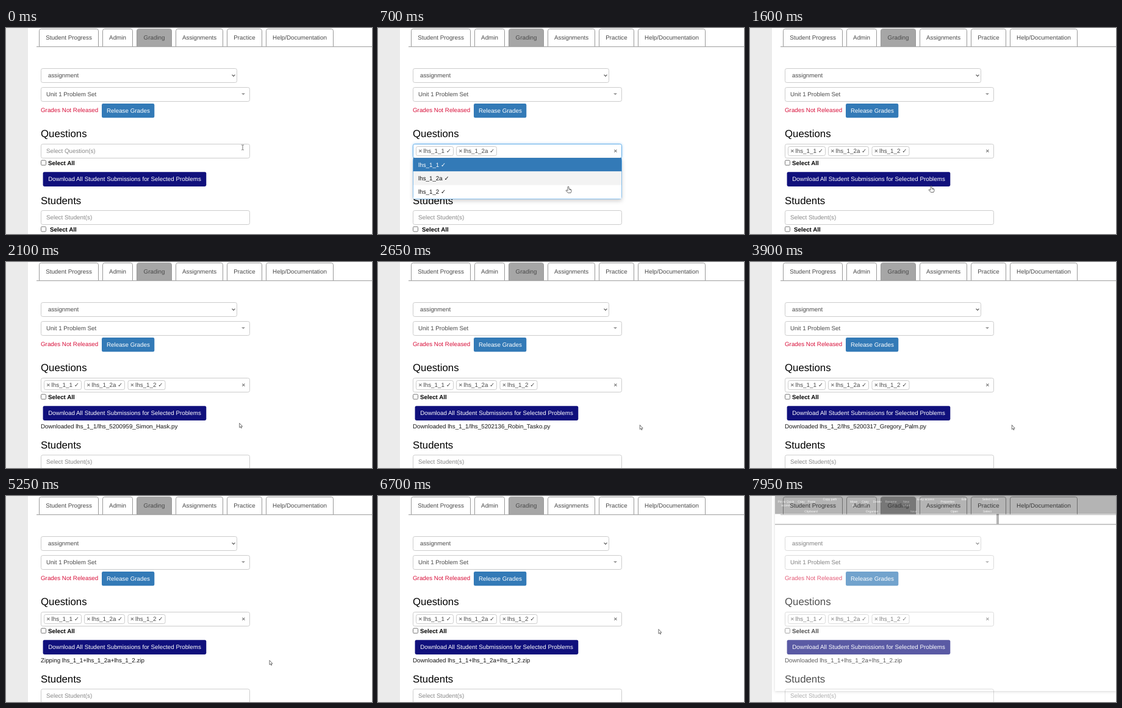
These frames come from a looping animation (600 px wide and 338 px high, 8000 ms). An HTML page:

```html
<!DOCTYPE html>
<html lang="en">
<head>
<meta charset="utf-8">
<title>Grading page</title>
<style>
html, body { margin: 0; width: 100%; height: 100%; overflow: hidden; background: #fff; }
svg { display: block; width: 600px; height: 338px; }
text { font: 9.8px "Liberation Sans", "DejaVu Sans", sans-serif; fill: #4a4a4a; white-space: pre; text-rendering: geometricPrecision; }
.head { font-size: 16.8px; fill: #000; }
.bold { font-weight: bold; fill: #000; }
.hint { fill: #888; }
.white { fill: #fff; }
.dark { fill: #151515; }
.red { fill: #d8103a; }
.cross { font-weight: bold; fill: #777; }
.tiny { font-size: 5px; fill: #fff; }
.mid { text-anchor: middle; }
</style>
</head>
<body>
<svg id="stage" viewBox="0 0 600 338"></svg>
<script>
const LOOP = 8000, TICK = 50;
const OPEN = 100, CLOSE = 1150, START = 1800, DONE = 6200, FADE = 7950;
const questions = ['lhs_1_1', 'lhs_1_2a', 'lhs_1_2'];
const picked = [300, 550, 800];
const students = ('Gregory_Palm Nora_Fenwell Toby_Marsk Lena_Orwick Paul_Drissen Ivy_Calder ' +
  'Simon_Hask Petra_Lowen Felix_Brandle Alma_Quist Hugo_Tarrin Dora_Wexley Martin_Sorb ' +
  'Clara_Venn Oscar_Pellow Judy_Kresh Ned_Farrow Robin_Tasko Elsie_Morn Victor_Glade Wanda_Pruitt').split(' ');
const ZIP = START + questions.length * students.length * TICK;

const stage = document.getElementById('stage');

function add(parent, tag, attrs, content) {
  const el = document.createElementNS('http://www.w3.org/2000/svg', tag);
  for (const key in attrs) el.setAttribute(key, attrs[key]);
  if (content) el.textContent = content;
  return parent.appendChild(el);
}
const group = (parent = stage) => add(parent, 'g', {});
const text = (parent, x, y, content, cls = '') => add(parent, 'text', { x, y, class: cls }, content);
const path = (parent, d, attrs) => add(parent, 'path', { d, fill: 'none', ...attrs });
const rect = (parent, x, y, width, height, fill, attrs) =>
  add(parent, 'rect', { x, y, width, height, fill, ...attrs });
const box = (parent, x, y, w, h, fill = '#fff', stroke = '#ccc', rx = 2.8) =>
  rect(parent, x + .5, y + .5, w - 1, h - 1, fill, { stroke, rx });
const checkbox = (parent, x, y) => box(parent, x, y, 9, 9, '#fff', '#767676', 1.5);
const show = (el, on) => el.setAttribute('visibility', on ? 'visible' : 'hidden');

// Page frame and tabs
rect(stage, 0, 0, 36, 338, '#ebebeb');
[['Student Progress', 54, 98], ['Admin', 158, 50], ['Grading', 214, 58],
 ['Assignments', 278, 78], ['Practice', 362, 58], ['Help/Documentation', 426, 111]].forEach(([label, x, w]) => {
  path(stage, `M${x + .5} 30.7V4.7q0-3 3-3h${w - 7}q3 0 3 3V30.7`,
    { stroke: '#999', fill: label === 'Grading' ? '#a6a6a6' : '#fff' });
  text(stage, x + w / 2, 19.1, label, 'mid');
});
path(stage, 'M50 30.7H600', { stroke: '#999' });

// Assignment choice
box(stage, 57, 66, 322, 24);
text(stage, 69, 81.2, 'assignment');
path(stage, 'M370.5 76.6l2.5 2.5 2.5-2.5', { stroke: '#555', 'stroke-width': 1.2 });
box(stage, 57, 97, 343, 24);
text(stage, 66, 111.6, 'Unit 1 Problem Set');
path(stage, 'M386 107h6l-3 3z', { fill: '#999' });
text(stage, 57, 137.5, 'Grades Not Released', 'red');
rect(stage, 157, 124, 86.3, 23.3, '#337ab7', { rx: 2.4 });
text(stage, 165, 138.7, 'Release Grades', 'white');

// Questions
text(stage, 57, 178.9, 'Questions', 'head');
const field = box(stage, 57, 190, 343, 24);
const hint = text(stage, 66, 205, 'Select Question(s)', 'hint');
const clear = text(stage, 386.5, 205, '×', 'cross');
const tags = questions.map((name, i) => {
  const g = group(), x = [62, 128, 199.5][i];
  box(g, x, 194, [62, 67, 62][i], 16);
  text(g, x + 4.5, 205, '×', 'cross');
  text(g, x + 12.6, 205, name + ' ✓');
  return g;
});
checkbox(stage, 57, 216.6);
text(stage, 69, 225.3, 'Select All', 'bold');
rect(stage, 60.6, 236.2, 267.7, 23.7, '#10107c', { rx: 2.4 });
text(stage, 69.3, 251, 'Download All Student Submissions for Selected Problems', 'white');
const message = text(stage, 57, 273.1, '', 'dark');

// Students
const lower = group();
text(lower, 57, 288.8, 'Students', 'head');
box(lower, 57, 299, 343, 24);
text(lower, 66, 314.2, 'Select Student(s)', 'hint');
checkbox(lower, 57, 325.5);
text(lower, 72, 334.4, 'Select All', 'bold');

// Drop-down list
const list = group();
list.style.filter = 'drop-shadow(0 3px 3px rgba(0,0,0,.18))';
box(list, 57, 213, 343, 68, '#fff', '#66afe9');
const rows = questions.map((name, i) => {
  const row = rect(list, 57.8, 213 + i * 22.4, 341.4, 22.4, i ? '#fff' : '#337ab7');
  text(list, 66, 227.5 + i * 22.2, name + ' ✓', i ? 'dark' : 'white');
  return row;
});

// Pointers, each drawn with its hot spot at 0,0
const outline = { stroke: '#333', 'stroke-width': .7, 'stroke-linejoin': 'round', fill: '#fff' };
const pointers = {
  beam: path(stage, 'M-2-4H-.5L0-3.5.5-4H2M0-3.5V3.5M-2 4H-.5L0 3.5.5 4H2', { stroke: '#555', 'stroke-width': .8 }),
  hand: path(stage, 'M-1 0.7Q0-.7 1 .7V4l3.4.8Q5 5 5 6.2V8L4 10.5H-.6L-3.8 7Q-4 5.5-2.6 6L-1 7.2ZM2 4.4V6M3.5 4.8V6.2', outline),
  arrow: path(stage, 'M0 0V7.2L1.6 5.8 2.7 8.2 3.8 7.7 2.8 5.4H4.9Z', outline)
};

// File window fading in at the end
const fade = group();
fade.setAttribute('opacity', .31);
rect(fade, 0, 0, 600, 338, '#fff');
rect(fade, 0, 0, 36, 338, '#ebebeb');
rect(fade, 41, 0, 559, 320, '#fff', { style: 'filter:drop-shadow(0 1px 2px rgba(0,0,0,.5))' });
rect(fade, 41, 0, 559, 29.5, '#111');
rect(fade, 41, 45.8, 559, 1.5, '#111');
rect(fade, 404, 29, 4, 18, '#111');
[['Pin to Quick', 59, 11], ['access', 59, 17], ['Copy', 84, 11], ['Paste', 101, 11], ['Copy path', 131, 7],
 ['Clipboard', 100, 27], ['Move', 170, 11], ['to', 170, 17], ['Copy', 189, 11], ['to', 189, 17],
 ['Delete', 209, 11], ['Rename', 231, 11], ['Organise', 200, 27], ['New', 256, 11], ['folder', 256, 17],
 ['Easy access', 288, 7], ['New', 268, 27], ['Properties', 324, 11], ['Edit', 351, 7], ['Open', 335, 27],
 ['Select none', 394, 7], ['Select', 389, 27]].forEach(([label, x, y]) => text(fade, x, y, label, 'tiny mid'));

// Pointer track: time, x, y, shape from that time on
const track = [
  [0, 388, 196, 'beam'], [100, 388, 196, 'hand'], [300, 335, 222, 'hand'], [550, 322, 244, 'hand'],
  [700, 312, 260, 'hand'], [850, 312, 262, 'hand'], [950, 345, 255, 'arrow'], [1150, 439, 215, 'arrow'],
  [1400, 320, 245, 'hand'], [1600, 297, 259, 'hand'], [1800, 297, 259, 'arrow'], [2300, 429.3, 267.4, 'arrow'],
  [4900, 429.3, 267.4, 'arrow'], [5050, 432, 269.6, 'arrow'], [6550, 432, 269.6, 'arrow'], [6900, 503, 140, '']
];

function movePointer(t) {
  const i = track.findLastIndex(k => k[0] <= t);
  const [t0, x0, y0, shape] = track[i];
  const [t1, x1, y1] = track[i + 1] || [LOOP, x0, y0];
  const p = (t - t0) / (t1 - t0), e = p * p * (3 - 2 * p);
  for (const name in pointers) show(pointers[name], name === shape);
  if (shape) pointers[shape].setAttribute('transform', `translate(${x0 + (x1 - x0) * e} ${y0 + (y1 - y0) * e})`);
}

function status(t) {
  if (t < START) return '';
  const all = questions.join('+') + '.zip';
  if (t >= DONE) return 'Downloaded ' + all;
  if (t >= ZIP) return 'Zipping ' + all;
  const n = Math.floor((t - START) / TICK), s = n % students.length;
  const id = 5200317 + s * 107;
  return `Downloaded ${questions[Math.floor(n / students.length)]}/lhs_${id}_${students[s]}.py`;
}

function draw(now) {
  const t = Math.floor((now % LOOP) / TICK) * TICK;
  const open = t >= OPEN && t < CLOSE;
  show(list, open);
  field.setAttribute('stroke', open ? '#66afe9' : '#ccc');
  field.style.filter = open ? 'drop-shadow(0 0 2px rgba(102,175,233,.6))' : '';
  questions.forEach((_, i) => {
    show(tags[i], t >= picked[i]);
    if (i) rows[i].setAttribute('fill', t >= picked[i] ? '#f3f3f3' : '#fff');
  });
  show(hint, t < picked[0]);
  show(clear, t >= picked[0]);
  message.textContent = status(t);
  lower.setAttribute('transform', `translate(0 ${t >= START ? 17.3 : 0})`);
  movePointer(t);
  show(fade, t >= FADE);
  requestAnimationFrame(() => draw(performance.now() - begin));
}
const begin = performance.now();
draw(0);
</script>
</body>
</html>
```
